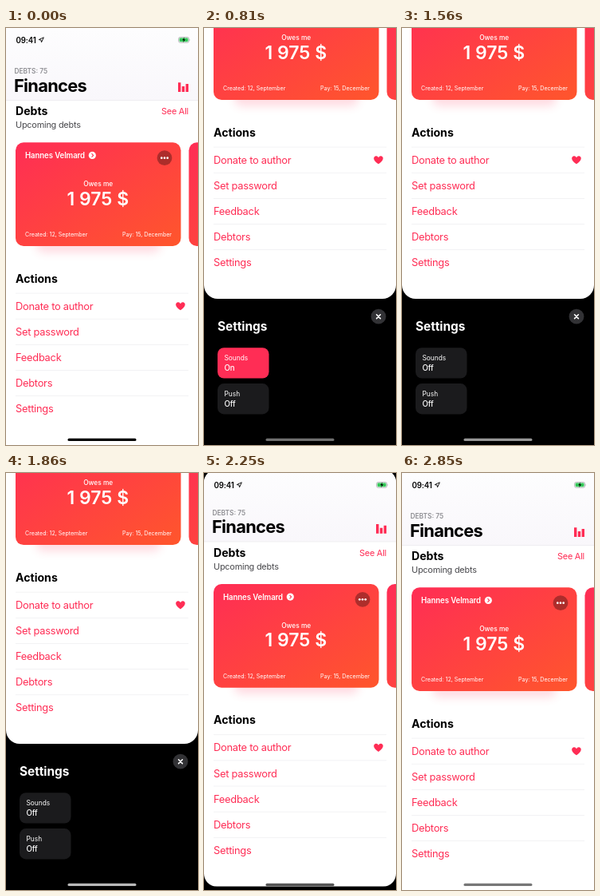
An HTML page that plays this animation: 241 px wide and 522 px high, repeating every 2880 ms.

```html
<!DOCTYPE html>
<html lang="en">
<head>
<meta charset="utf-8">
<title>Finances</title>
<style>
  html, body { margin: 0; width: 100%; height: 100%; overflow: hidden; background: #000; }
  svg { display: block; width: 241px; height: 522px; font-family: Inter, Roboto, sans-serif; }
  .title { font-size: 14.1px; font-weight: 700; }
  .sub { font-size: 10.9px; letter-spacing: -.02em; }
  .row { font-size: 12.85px; letter-spacing: -.02em; }
  .small { font-size: 8.36px; }
  .tiny { font-size: 7.07px; }
  .label { font-size: 9.64px; letter-spacing: -.01em; }
  .medium { font-weight: 500; }
  .semi { font-weight: 600; }
  .white { fill: #fff; }
  .red { fill: #ff2d55; }
</style>
</head>
<body>
<svg viewBox="0 0 241 522">
  <defs>
    <linearGradient id="cardFill" x1="0" y1="0" x2="1" y2="1">
      <stop offset="0" stop-color="#ff2d55"/>
      <stop offset="1" stop-color="#ff562c"/>
    </linearGradient>
    <linearGradient id="headerFill" x1="0" y1="0" x2="0" y2="1">
      <stop offset="0" stop-color="#fdfdfe"/>
      <stop offset="1" stop-color="#f9f7fb"/>
    </linearGradient>
    <filter id="blur" x="-20%" y="-80%" width="140%" height="260%">
      <feGaussianBlur stdDeviation="6"/>
    </filter>
    <clipPath id="sheetClip"><rect id="sheetShape" width="241" height="522"/></clipPath>
  </defs>

  <rect width="241" height="522"/>

  <!-- Settings panel -->
  <text class="title white" x="17" y="379.3" style="font-size: 15.4px">Settings</text>
  <circle cx="219" cy="361.2" r="9.4" fill="#323235"/>
  <path d="M216.6 358.8l4.8 4.8m0-4.8l-4.8 4.8" stroke="#fff" stroke-width="1.6" stroke-linecap="round"/>
  <g class="white">
    <rect id="soundTile" x="17" y="400.2" width="64.5" height="38.3" rx="8"/>
    <text class="small" x="25.5" y="416.2">Sounds</text>
    <text id="soundState" class="label medium" x="25.5" y="429.2">On</text>
    <rect x="17" y="445.1" width="64.5" height="38.3" rx="8" fill="#1b1b1d"/>
    <text class="small" x="25.5" y="461">Push</text>
    <text class="label medium" x="25.5" y="474">Off</text>
  </g>

  <!-- Main sheet -->
  <g id="sheet" clip-path="url(#sheetClip)">
    <rect width="241" height="522" fill="#fff"/>
    <rect width="241" height="90" fill="url(#headerFill)"/>
    <rect y="90" width="241" height=".6" fill="#e4e2e8"/>
    <text class="small semi" x="10.5" y="57" fill="#8e8e93">DEBTS: 75</text>
    <text x="10" y="79.7" font-size="21.85" font-weight="700" letter-spacing="-.72">Finances</text>
    <path class="red" d="M216 68.3h3.4V80H216zM220.8 73h3.4v7h-3.4zM225.6 70h3.4v10h-3.4z"/>

    <text class="title" x="12" y="109">Debts</text>
    <text class="sub red" x="229" y="108" text-anchor="end">See All</text>
    <text class="sub" x="12" y="125.3" fill="#48484c">Upcoming debts</text>

    <rect x="38" y="256" width="156" height="25" rx="9" fill="#ff2d55" opacity=".17" filter="url(#blur)"/>
    <rect x="12" y="143.3" width="207.5" height="129.7" rx="10" fill="url(#cardFill)"/>
    <rect x="229.5" y="143.3" width="207.5" height="129.7" rx="10" fill="url(#cardFill)"/>
    <g class="white">
      <text class="label semi" x="24" y="163">Hannes Velmard</text>
      <circle cx="108.3" cy="159.4" r="4.6"/>
      <path d="M107.5 157.2l2.1 2.2l-2.1 2.2" fill="none" stroke="#ff304f" stroke-width="1.1"/>
      <circle cx="199" cy="162.7" r="9.4" fill="#000" opacity=".32"/>
      <circle cx="195.3" cy="162.7" r="1.35"/>
      <circle cx="199" cy="162.7" r="1.35"/>
      <circle cx="202.7" cy="162.7" r="1.35"/>
      <text class="small medium" x="115.7" y="198" text-anchor="middle">Owes me</text>
      <text class="semi" x="115.3" y="221.5" text-anchor="middle" font-size="23">1 975 $</text>
      <text class="tiny" x="24" y="261.2">Created: 12, September</text>
      <text class="tiny" x="208" y="261.2" text-anchor="end">Pay: 15, December</text>
    </g>

    <text class="title" x="12" y="318.5">Actions</text>
    <g id="rows"></g>
    <path class="red" d="M219 353.3C209.9 347.2 213.6 342.9 216.3 343.2Q218.1 343.4 219 345.2Q219.9 343.4 221.7 343.2C224.4 342.9 228.1 347.2 219 353.3Z"/>
  </g>

  <!-- Status bar and home indicator -->
  <g id="status">
    <text class="label semi" x="12.5" y="18.5">09:41</text>
    <path d="M47.3 11.8l-6.1 2.8l2.8.5l.5 2.8z" fill="none" stroke="#000" stroke-width=".9" stroke-linejoin="round"/>
    <rect x="216.6" y="11.6" width="13" height="6.6" rx="1.9" fill="none" stroke="#9a9aa0" stroke-width=".7"/>
    <rect x="217.6" y="12.6" width="11" height="4.6" rx="1.1" fill="#34c759"/>
    <path d="M230.5 13.7q1.4 1.2 0 2.4z" fill="#9a9aa0"/>
    <path d="M223.9 11.6l-2.6 3.7h1.7l-.7 3l2.8-4h-1.8z"/>
  </g>
  <rect id="home" x="77.5" y="513.8" width="86" height="3.2" rx="1.6"/>
</svg>

<script>
  const LOOP = 2880, TRAVEL = 183, SLIDE = 430;
  const OPEN_AT = 291, TOGGLE_AT = 1200, CLOSE_AT = 1855;
  const HOME_SHADES = [[0, 0], [180, 0], [450, 74], [800, 110], [1560, 150], [2070, 210], [2250, 85], [2700, 119], [LOOP, 119]];
  const $ = id => document.getElementById(id);
  const clamp = v => Math.min(1, Math.max(0, v));
  const mix = (a, b, k) => a + (b - a) * k;
  const smooth = v => { v = clamp(v); return v * v * (3 - 2 * v); };

  $('rows').innerHTML = ['Donate to author', 'Set password', 'Feedback', 'Debtors', 'Settings'].map((name, i) => {
    const y = 331.7 + i * 32.15;
    return `<rect x="12" y="${y}" width="217" height=".7" fill="#ededf0"/>
      <text class="row red" x="12" y="${y + 21}">${name}</text>`;
  }).join('');

  function keyed(keys, t) {
    const i = keys.findIndex(key => key[0] > t);
    const [t0, a] = keys[i - 1], [t1, b] = keys[i];
    return mix(a, b, (t - t0) / (t1 - t0));
  }

  function draw(t) {
    const open = smooth((t - OPEN_AT) / SLIDE) - smooth((t - CLOSE_AT) / (SLIDE + 6));
    $('sheet').setAttribute('transform', `translate(0 ${-TRAVEL * open})`);
    $('sheetShape').setAttribute('rx', 17 * clamp(open * 40));
    $('status').setAttribute('opacity', clamp(1.1 - open * 2.3));

    const off = smooth((t - TOGGLE_AT) / 150);
    const tile = [[255, 27], [45, 27], [85, 29]].map(([a, b]) => Math.round(mix(a, b, off)));
    $('soundTile').setAttribute('fill', `rgb(${tile})`);
    $('soundState').textContent = off < .5 ? 'On' : 'Off';

    const shade = Math.round(keyed(HOME_SHADES, t));
    $('home').setAttribute('fill', `rgb(${shade},${shade},${shade})`);
  }

  const start = performance.now();
  function tick() {
    draw((performance.now() - start) % LOOP);
    requestAnimationFrame(tick);
  }
  draw(0);
  requestAnimationFrame(tick);
</script>
</body>
</html>
```
